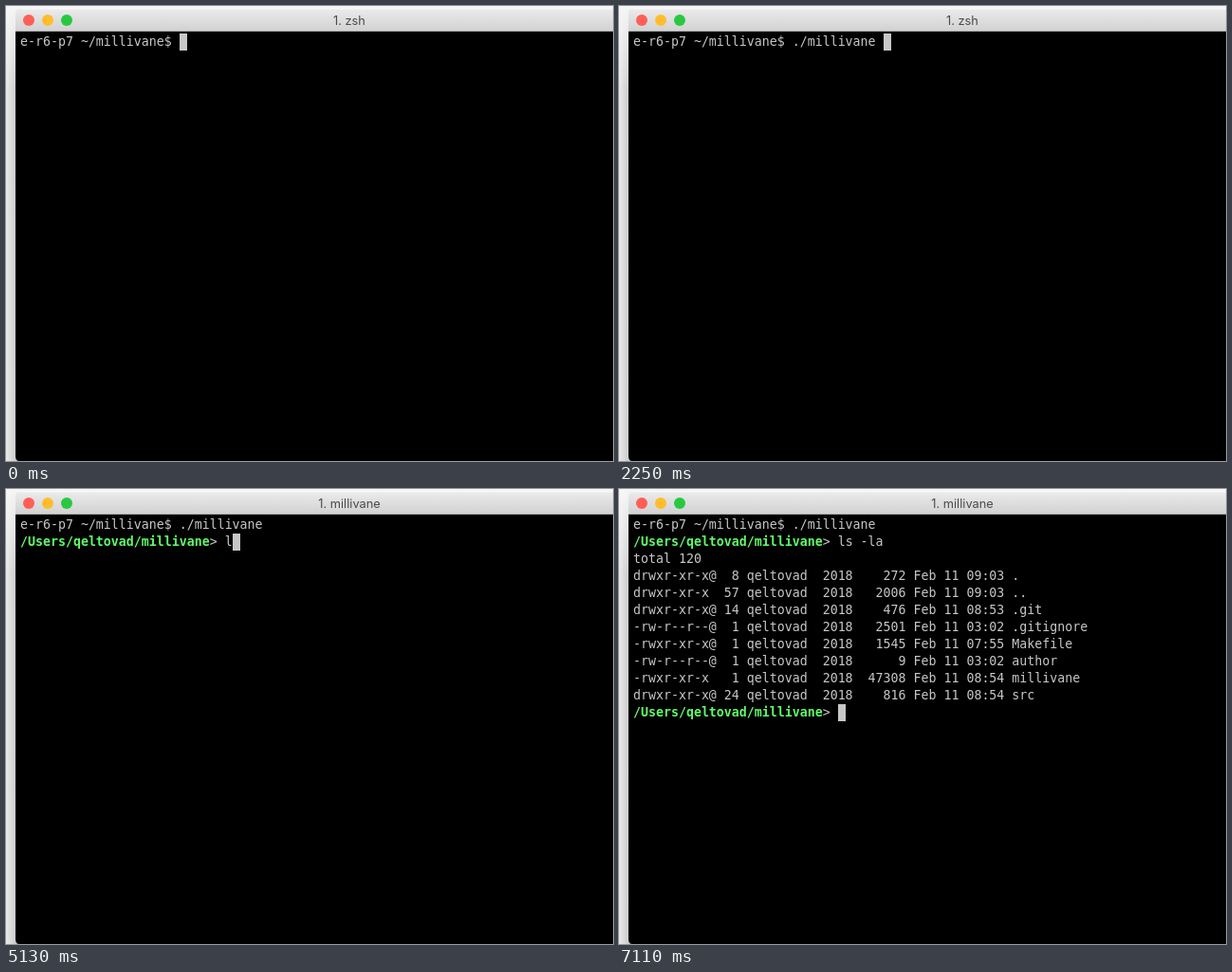
Animation of 640 by 480 pixels, one loop 8000 ms. Source, as an HTML page:

```html
<!DOCTYPE html>
<html lang="en">
<head>
<meta charset="utf-8">
<title>Terminal session</title>
<style>
  html, body { margin: 0; width: 100%; height: 100%; overflow: hidden; background: #f6f6f6; }
  svg { display: block; width: 640px; height: 480px; }
  text { white-space: pre; }
  .term { font: 13.288px "DejaVu Sans Mono", monospace; fill: #c7c7c7; }
  .path { font-weight: bold; fill: #5ffa68; }
  .title { font: 12.8px Inter, sans-serif; fill: #4a4a4a; text-anchor: middle; }
</style>
</head>
<body>
<svg viewBox="0 0 640 480">
  <defs>
    <linearGradient id="bar" x2="0" y2="1">
      <stop stop-color="#ebebeb"/>
      <stop offset="1" stop-color="#d2d2d2"/>
    </linearGradient>
    <linearGradient id="side">
      <stop stop-color="#000" stop-opacity=".05"/>
      <stop offset="1" stop-color="#000" stop-opacity=".22"/>
    </linearGradient>
    <linearGradient id="fade" x2="0" y2="1">
      <stop stop-color="#f6f6f6"/>
      <stop offset="1" stop-color="#f6f6f6" stop-opacity="0"/>
    </linearGradient>
  </defs>
  <rect width="640" height="480" fill="#f6f6f6"/>
  <rect width="14" height="480" fill="url(#side)"/>
  <rect width="14" height="90" fill="url(#fade)"/>
  <path d="M10 26H640V480H14Q10 480 10 475Z" fill="#000"/>
  <path d="M10 26V8Q10 3 15 3H640V26Z" fill="url(#bar)"/>
  <path d="M15 3.5H640" stroke="#f2f2f2"/>
  <path d="M10 26.5H640" stroke="#a9a9a9"/>
  <circle cx="24" cy="15" r="6" fill="#ff5f57"/>
  <circle cx="44" cy="15" r="6" fill="#ffbd2e"/>
  <circle cx="64" cy="15" r="6" fill="#28c940"/>
  <text id="title" class="title" x="362" y="20"></text>
  <g id="rows" class="term"></g>
  <rect id="cursor" width="8" height="18" fill="#c7c7c7"/>
</svg>
<script>
const LOOP = 8000, LEFT = 15, TOP = 29, CELL = 8, LINE = 18;
const APP = "millivane", USER = "qeltovad";
const HOST = `e-r6-p7 ~/${APP}$ `;
const PATH = `/Users/${USER}/${APP}`;
const COMMAND = `./${APP} `, LIST = "ls -la";

// [time, characters typed so far]
const launchKeys = [[810, 1], [900, 2], [1800, 3], [1890, 4], [2250, COMMAND.length]];
const listKeys = [[5130, 1], [5220, 2], [5310, 3], [6030, 4], [6300, 5], [6570, 6]];
const START = 3600, RETITLE = 4230, OUTPUT = 7110;

const entry = (mode, links, size, time, name) =>
  `${mode.padEnd(11)} ${String(links).padStart(2)} ${USER}  2018` +
  `${String(size).padStart(7)} Feb 11 ${time} ${name}`;

const listing = [
  "total 120",
  entry("drwxr-xr-x@", 8, 272, "09:03", "."),
  entry("drwxr-xr-x", 57, 2006, "09:03", ".."),
  entry("drwxr-xr-x@", 14, 476, "08:53", ".git"),
  entry("-rw-r--r--@", 1, 2501, "03:02", ".gitignore"),
  entry("-rwxr-xr-x@", 1, 1545, "07:55", "Makefile"),
  entry("-rw-r--r--@", 1, 9, "03:02", "author"),
  entry("-rwxr-xr-x", 1, 47308, "08:54", APP),
  entry("drwxr-xr-x@", 24, 816, "08:54", "src")
];

const title = document.getElementById("title");
const cursor = document.getElementById("cursor");
const rows = document.getElementById("rows");

function make(tag, parent, attrs) {
  const el = document.createElementNS("http://www.w3.org/2000/svg", tag);
  for (const key in attrs) el.setAttribute(key, attrs[key]);
  return parent.appendChild(el);
}

const lines = Array.from({ length: listing.length + 3 }, (_, i) => {
  const text = make("text", rows, { x: LEFT, y: TOP + 13 + i * LINE });
  return { path: make("tspan", text, { class: "path" }), rest: make("tspan", text, {}) };
});

function typed(text, keys, t) {
  const count = keys.reduce((n, [time, length]) => t >= time ? length : n, 0);
  return text.slice(0, count);
}

function setText(el, value) {
  if (el.textContent !== value) el.textContent = value;
}

function screenAt(t) {
  const screen = [["", HOST + typed(COMMAND, launchKeys, t)]];
  if (t >= START) screen.push([PATH, "> " + typed(LIST, listKeys, t)]);
  if (t >= OUTPUT) screen.push(...listing.map(row => ["", row]), [PATH, "> "]);
  return screen;
}

function draw(t) {
  const screen = screenAt(t);
  lines.forEach((line, i) => {
    const [path, rest] = screen[i] || ["", ""];
    setText(line.path, path);
    setText(line.rest, rest);
  });
  setText(title, "1. " + (t < RETITLE ? "zsh" : APP));
  const last = screen.length - 1;
  cursor.setAttribute("x", LEFT + CELL * screen[last].join("").length);
  cursor.setAttribute("y", TOP + LINE * last);
}

const start = performance.now();
function tick() {
  draw((performance.now() - start) % LOOP);
  requestAnimationFrame(tick);
}
tick();
</script>
</body>
</html>
```
